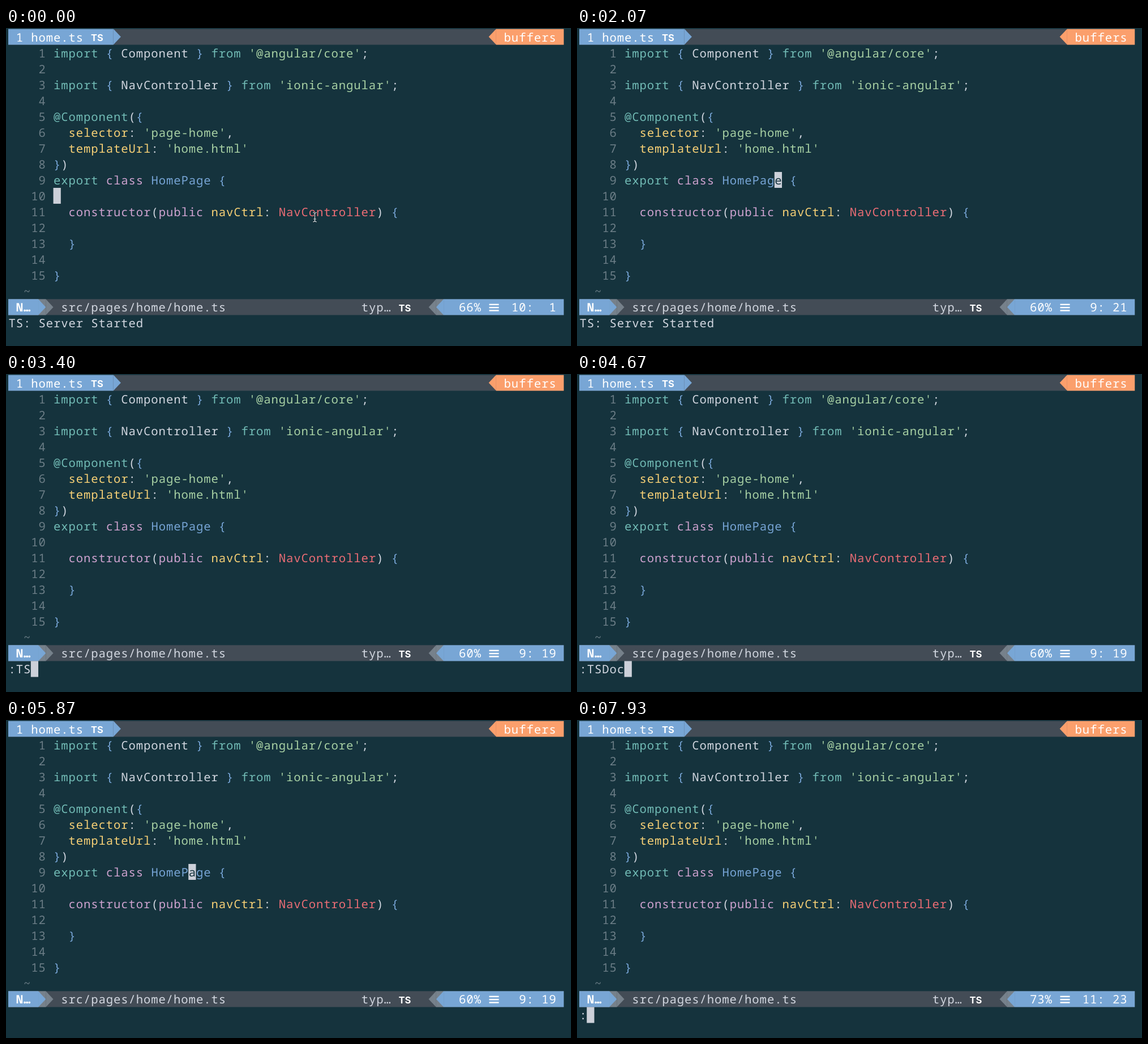
Recreate the animation shown at these times as an HTML page. Size 998 by 561 pixels, loop 8000 ms.

```html
<!DOCTYPE html>
<html lang="en">
<head>
<meta charset="utf-8">
<title>Editor session</title>
<style>
  html, body { margin: 0; width: 100%; height: 100%; overflow: hidden; background: #15333d; }
  svg { display: block; width: 100vw; height: 100vh; }
  text {
    font-family: "Noto Sans Mono", "DejaVu Sans Mono", monospace;
    font-size: 20.6px;
    font-variant-ligatures: none;
    text-rendering: geometricPrecision;
  }
  .f { fill: #d2d7e0; }
  .n { fill: #6b7d86; }
  .k { fill: #72bcb6; }
  .b { fill: #77a5d6; }
  .g { fill: #a8d1a4; }
  .y { fill: #f8d176; }
  .p { fill: #cfa3d0; }
  .r { fill: #ec6d75; }
  .w { fill: #fff; }
  .d { fill: #15333d; }
  .bold { font-weight: 700; }
  .tag { font: 700 16.5px Inter, "Open Sans", sans-serif; letter-spacing: 0; }
  .bar { fill: #434c56; }
  .mid { fill: #76818b; }
  .blue { fill: #78a6d5; }
  .orange { fill: #fb9f6c; }
  .caret { fill: #ccd0d9; }
  .bg { fill: #15333d; }
</style>
</head>
<body>
<svg id="stage" viewBox="0 0 998 561">
  <defs>
    <path id="beam" d="M542.5 325.5q3 .3 3 2.5v11.5q0 2.2-3 2.5M548.5 325.5q-3 .3-3 2.5v11.5q0 2.2 3 2.5M543.5 337h4"/>
  </defs>
  <g id="view"></g>
  <rect class="bg" width="998" height="1.5"/>
  <g id="prompt"></g>
  <g id="caret"></g>
  <g id="mouse" fill="none" stroke-linecap="round">
    <use href="#beam" stroke="#10252d" stroke-width="2.6"/>
    <use href="#beam" stroke="#dfe5e8" stroke-width="1.1"/>
  </g>
</svg>
<script>
const NS = 'http://www.w3.org/2000/svg';
const CELL = 13.26, ROW = 28.05, LEFT = 4, TOP = 1.5;
const GUTTER = 6, LOOP = 8000;
const X = col => LEFT + col * CELL;
const Y = row => TOP + row * ROW;
const $ = id => document.getElementById(id);
const view = $('view'), prompt = $('prompt'), caret = $('caret');

// [x] switches to colour class x
const code = [
  "[k]import[b] {[f] Component[b] }[k] from[g] '@angular/core'[f];",
  "",
  "[k]import[b] {[f] NavController[b] }[k] from[g] 'ionic-angular'[f];",
  "",
  "[k]@Component[f]([b]{",
  "[y]  selector[f]:[g] 'page-home'[f],",
  "[y]  templateUrl[f]:[g] 'home.html'",
  "[b]}[f])",
  "[k]export[p] class[b] HomePage {",
  "",
  "[p]  constructor[f]([p]public[y] navCtrl[f]:[r] NavController[f])[b] {",
  "",
  "[b]  }",
  "",
  "[b]}"
];
const plain = code.map(s => s.replace(/\[\w\]/g, ''));

function add(parent, name, attrs) {
  const el = document.createElementNS(NS, name);
  for (const key in attrs) el.setAttribute(key, attrs[key]);
  return parent.appendChild(el);
}

let inset = 0;  // room left of a glyph inside its cell

// Puts text on the grid, skipping its leading spaces
function place(el, col, str) {
  const body = str.trimStart();
  el.setAttribute('x', X(col + str.length - body.length) + inset);
  el.textContent = body;
}

function write(parent, row, col, str, cls = 'f') {
  const el = add(parent, 'text', { y: Y(row) + 22, class: cls });
  place(el, col, str);
  return el;
}

function block(parent, row, col, end, cls) {
  add(parent, 'rect', { x: X(col), y: Y(row), width: (end - col) * CELL, height: ROW, class: cls });
}

// Triangle one cell wide, from its flat side to its tip
function arrow(parent, row, flat, tip, cls) {
  const y = Y(row);
  add(parent, 'path', { d: `M${X(flat)} ${y}L${X(tip)} ${y + ROW / 2}L${X(flat)} ${y + ROW}z`, class: cls });
}

function tag(row, x) {
  add(view, 'text', { x, y: Y(row) + 21.5, class: 'tag w' }).textContent = 'TS';
}

function buildTabs() {
  block(view, 0, 0, 74, 'bar');
  block(view, 0, 0, 14, 'blue');
  arrow(view, 0, 14, 15, 'blue');
  write(view, 0, 1, '1', 'w');
  write(view, 0, 3, 'home.ts', 'w');
  tag(0, 150);
  arrow(view, 0, 65, 64, 'orange');
  block(view, 0, 65, 74, 'orange');
  write(view, 0, 66, 'buffers', 'w');
}

function buildCode() {
  code.forEach((line, i) => {
    write(view, i + 1, 1, String(i + 1).padStart(4), 'n');
    let col = GUTTER;
    const parts = line.split(/\[(\w)\]/);
    for (let j = 1; j < parts.length; j += 2) {
      write(view, i + 1, col, parts[j + 1], parts[j]);
      col += parts[j + 1].length;
    }
  });
  write(view, 16, 2, '~', 'n');
}

function buildStatus() {
  const row = 17;
  block(view, row, 0, 74, 'bar');
  block(view, row, 0, 5, 'mid');
  arrow(view, row, 5, 6, 'mid');
  block(view, row, 0, 4, 'blue');
  arrow(view, row, 4, 5, 'blue');
  write(view, row, 1, 'N…', 'w bold');
  write(view, row, 7, 'src/pages/home/home.ts');
  write(view, row, 47, 'typ…');
  tag(row, 693.5);
  arrow(view, row, 57, 56, 'mid');
  block(view, row, 57, 58, 'mid');
  arrow(view, row, 58, 57, 'blue');
  block(view, row, 58, 74, 'blue');
  for (let i = 0; i < 3; i++)
    add(view, 'rect', { x: 853.5, y: Y(row) + 8.3 + i * 5.3, width: 17, height: 2.4, class: 'w' });
}

// Each step patches the state before it
const steps = [
  [0, { line: 10, col: 1, msg: 'TS: Server Started', cmd: null, paged: false, mouse: true }],
  [1200, { line: 9, mouse: false }],
  [1530, { col: 6 }],
  [1930, { col: 12 }],
  [2070, { col: 21 }],
  [2270, { col: 20 }],
  [2400, { col: 19 }],
  [2870, { cmd: ':', msg: '' }],
  [3130, { cmd: ':T' }],
  [3400, { cmd: ':TS' }],
  [4470, { cmd: ':TSD' }],
  [4530, { cmd: ':TSDo' }],
  [4670, { cmd: ':TSDoc' }],
  [5070, { cmd: 'Press ENTER or type command to continue', paged: true }],
  [5870, { cmd: null, paged: false }],
  [6530, { line: 10, col: 1 }],
  [6800, { line: 11, col: 19 }],
  [7070, { col: 20 }],
  [7470, { col: 22 }],
  [7530, { col: 23 }],
  [7930, { cmd: ':' }]
];

// Space the glyphs so that each advance fills one cell
const pen = document.createElement('canvas').getContext('2d');
const probe = write(view, 0, 0, '0');
const { fontFamily, fontSize } = getComputedStyle(probe);
probe.remove();
pen.font = '100px ' + fontFamily;
const gap = CELL - pen.measureText('0').width * parseFloat(fontSize) / 100;
$('stage').style.letterSpacing = gap + 'px';
inset = gap / 2;

buildTabs();
buildCode();
buildStatus();
const percent = write(view, 17, 60, '', 'w');
const lineNo = write(view, 17, 67, '', 'w');
const colNo = write(view, 17, 71, '', 'w');

function draw(s) {
  view.setAttribute('transform', `translate(0 ${s.paged ? -2 * ROW : 0})`);
  $('mouse').style.display = s.mouse ? '' : 'none';
  place(percent, 60, Math.floor(s.line / code.length * 100) + '%');
  place(lineNo, 67, String(s.line).padStart(2) + ':');
  place(colNo, 71, String(s.col).padStart(2));

  prompt.replaceChildren();
  caret.replaceChildren();
  if (s.paged) write(prompt, 16, 0, 'class HomePage');
  write(prompt, 18, 0, s.cmd ?? s.msg, s.paged ? 'b' : 'f');

  const typing = s.cmd !== null;
  const row = typing ? 18 : s.line;
  const col = typing ? s.cmd.length : GUTTER + s.col - 1;
  block(caret, row, col, col + 1, 'caret');
  if (!typing) write(caret, row, col, plain[s.line - 1][s.col - 1] || '', 'd');
}

let shown = -1;
function tick() {
  const t = performance.now() % LOOP;
  const past = steps.filter(([at]) => at <= t);
  if (past.length !== shown) {
    shown = past.length;
    draw(Object.assign({}, ...past.map(([, patch]) => patch)));
  }
  requestAnimationFrame(tick);
}
tick();
</script>
</body>
</html>
```
